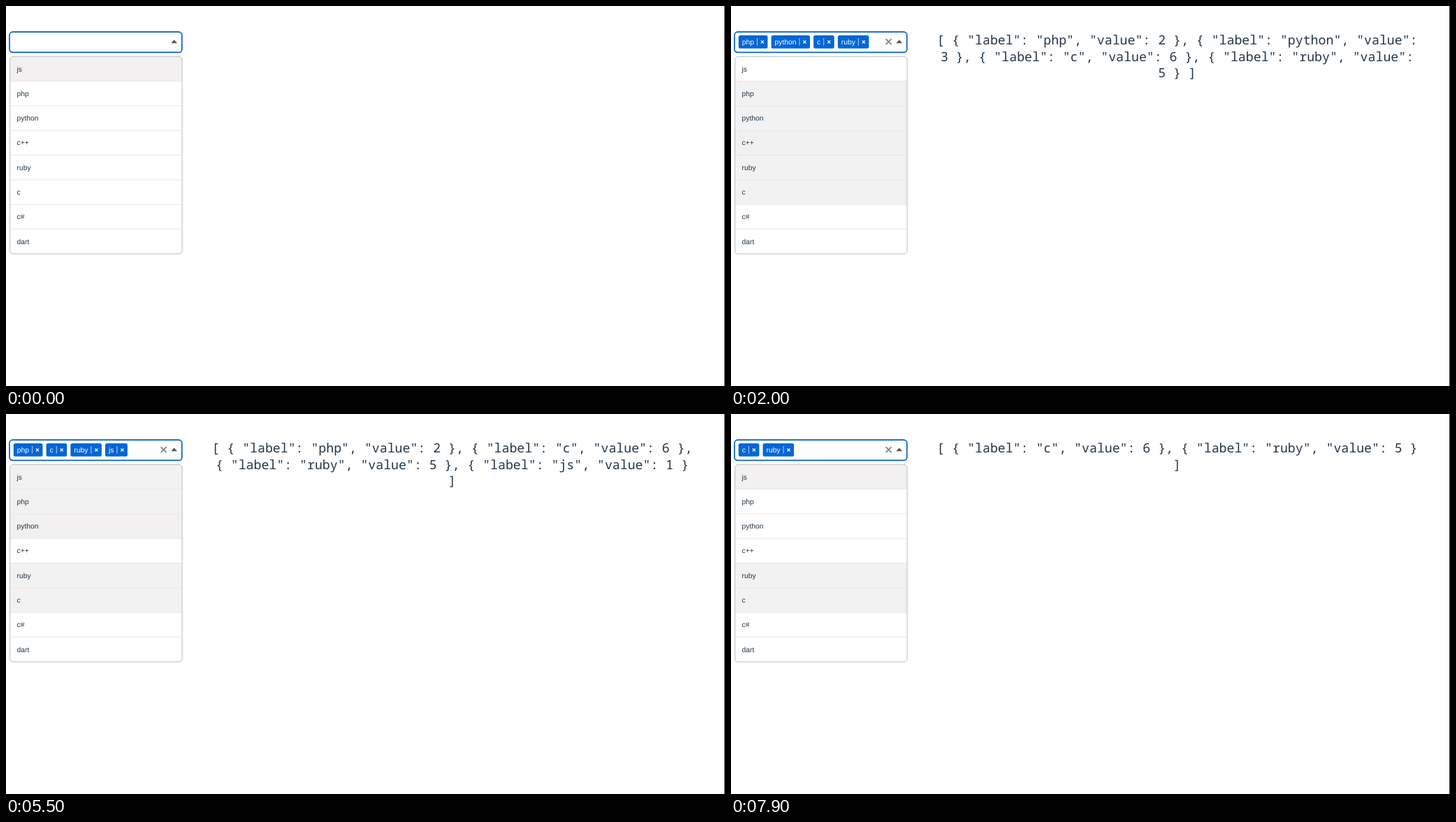
Animation of 1029 by 544 pixels, one loop 8000 ms. Source, as an HTML page:

```html
<!DOCTYPE html>
<html lang="en">
<head>
<meta charset="utf-8">
<title>Multi select</title>
<style>
  html, body { margin: 0; width: 100%; height: 100%; overflow: hidden; background: #fff; }
  svg { display: block; width: 1029px; height: 544px; }
  text { text-rendering: geometricPrecision; fill: #213547; }
  .ui { font: 10.3px "Liberation Sans", Arial, sans-serif; }
  .code { font: 18.217px "Noto Sans Mono", monospace; }
  .chip text { fill: #fff; }
</style>
</head>
<body>
<svg id="stage" viewBox="0 0 1029 544">
  <defs><clipPath id="round"><rect id="clip" x="5.7" width="246.4" height="282.6" rx="5"/></clipPath></defs>
  <rect id="field" x="5" y="37.2" width="246.8" rx="4.5" fill="#fff" stroke="#0660c0" stroke-width="1.7"/>
  <g id="chips"></g>
  <path id="clear" d="M221.6 47.2l8 8m0-8l-8 8" stroke="#858585" stroke-width="1.9"/>
  <path d="M236.3 53.2h8.8l-4.4-4.6z" fill="#555"/>
  <g id="list"></g>
  <g id="output"></g>
  <rect x="1028" width="1" height="544" fill="#2b2b2b"/>
</svg>
<script>
const LOOP = 8000;
const OPTIONS = ['js', 'php', 'python', 'c++', 'ruby', 'c', 'c#', 'dart'];
const ROW = 35.3, LINE = 23.55, MAX_CHARS = 63, FIELD_RIGHT = 216;

// [time, option toggled]
const CLICKS = [
  [400, 'php'], [800, 'python'], [1200, 'c'], [1900, 'ruby'], [2300, 'c++'],
  [2900, 'js'], [4800, 'c++'], [5500, 'python'], [6300, 'php'], [7200, 'js']
];
// [time, option under the pointer]
const HOVERS = [
  [0, 'js'], [100, 'php'], [600, 'python'], [900, 'ruby'], [1000, 'c'],
  [1600, 'ruby'], [2000, 'c++'], [2500, 'js'], [3800, 'c++'],
  [5000, 'python'], [6100, 'php'], [6300, ''], [7000, 'js']
];

const $ = id => document.getElementById(id);
const pen = document.createElement('canvas').getContext('2d');
pen.font = '10.3px "Liberation Sans", Arial, sans-serif';
const textWidth = s => pen.measureText(s).width;
const escapeText = s => s.replace(/&/g, '&amp;').replace(/</g, '&lt;');
const label = (cls, x, y, s, extra = '') =>
  `<text class="${cls}" x="${x}" y="${y}" ${extra}>${escapeText(s)}</text>`;

function chosenAt(t) {
  const chosen = [];
  for (const [at, name] of CLICKS) {
    if (at > t) break;
    const i = chosen.indexOf(name);
    if (i < 0) chosen.push(name);
    else chosen.splice(i, 1);
  }
  return chosen;
}

function hoverAt(t) {
  let hover = '';
  for (const [at, name] of HOVERS) if (at <= t) hover = name;
  return hover;
}

function drawChips(chosen) {
  let x = 10.8, row = 0, html = '';
  for (const name of chosen) {
    const tw = textWidth(name), w = tw + 24.5;
    if (x + w > FIELD_RIGHT) { x = 10.8; row++; }
    const y = 42 + row * 23.6, sep = x + tw + 9.2;
    html += `<g class="chip"><rect x="${x}" y="${y}" width="${w}" height="18.8" rx="2.6" fill="#0366d6"/>` +
      label('ui', x + 5, y + 13, name) +
      `<path d="M${sep + .3} ${y + 4}v10.6" stroke="#fff" stroke-opacity=".8" stroke-width=".9"/>` +
      `<path d="M${sep + 5.7} ${y + 7.4}l4.1 4.1m0-4.1l-4.1 4.1" stroke="#fff" stroke-width="1.15"/></g>`;
    x += w + 5.1;
  }
  $('chips').innerHTML = html;
  return row;
}

function drawList(top, chosen, hover) {
  let fills = '', lines = '', names = '';
  OPTIONS.forEach((name, i) => {
    const y = top + i * ROW;
    const fill = chosen.includes(name) ? '#f2f2f2' : name === hover ? '#f3f0f1' : '#fff';
    fills += `<rect x="5" y="${y}" width="248" height="${ROW + .2}" fill="${fill}"/>`;
    if (i) lines += `<path d="M6 ${y}h246" stroke="#e8e8e8"/>`;
    names += label('ui', 15.5, y + 21.2, name);
  });
  $('clip').setAttribute('y', top);
  $('list').innerHTML = `<g clip-path="url(#round)">${fills}${lines}</g>${names}` +
    `<rect x="5.7" y="${top}" width="246.4" height="282.6" rx="5" fill="none" stroke="#bcbcbc"/>`;
}

function wrap(words) {
  const lines = [];
  let line = '';
  for (const word of words) {
    const next = line ? line + ' ' + word : word;
    if (next.length > MAX_CHARS) { lines.push(line); line = word; }
    else line = next;
  }
  return [...lines, line];
}

function drawOutput(chosen) {
  if (!chosen.length) { $('output').innerHTML = ''; return; }
  const items = chosen.map(n => `{ "label": "${n}", "value": ${OPTIONS.indexOf(n) + 1} }`);
  const lines = wrap(`[ ${items.join(', ')} ]`.split(' '));
  // A single line shrinks its block to the left edge; wrapped lines are centred.
  const single = lines.length === 1;
  $('output').innerHTML = lines.map((s, i) =>
    label('code', single ? 291.5 : 638.5, 55 + i * LINE, s, single ? '' : 'text-anchor="middle"')).join('');
}

let last = '';
function render(t) {
  const chosen = chosenAt(t), hover = hoverAt(t);
  const key = chosen + '|' + hover;
  if (key === last) return;
  last = key;
  const grow = drawChips(chosen) * 23.6;
  $('field').setAttribute('height', 29.2 + grow);
  $('clear').style.display = chosen.length ? '' : 'none';
  drawList(72.3 + grow, chosen, hover);
  drawOutput(chosen);
}

const start = performance.now();
function tick(now) {
  render(Math.max(0, now - start) % LOOP);
  requestAnimationFrame(tick);
}
render(0);
requestAnimationFrame(tick);
</script>
</body>
</html>
```
